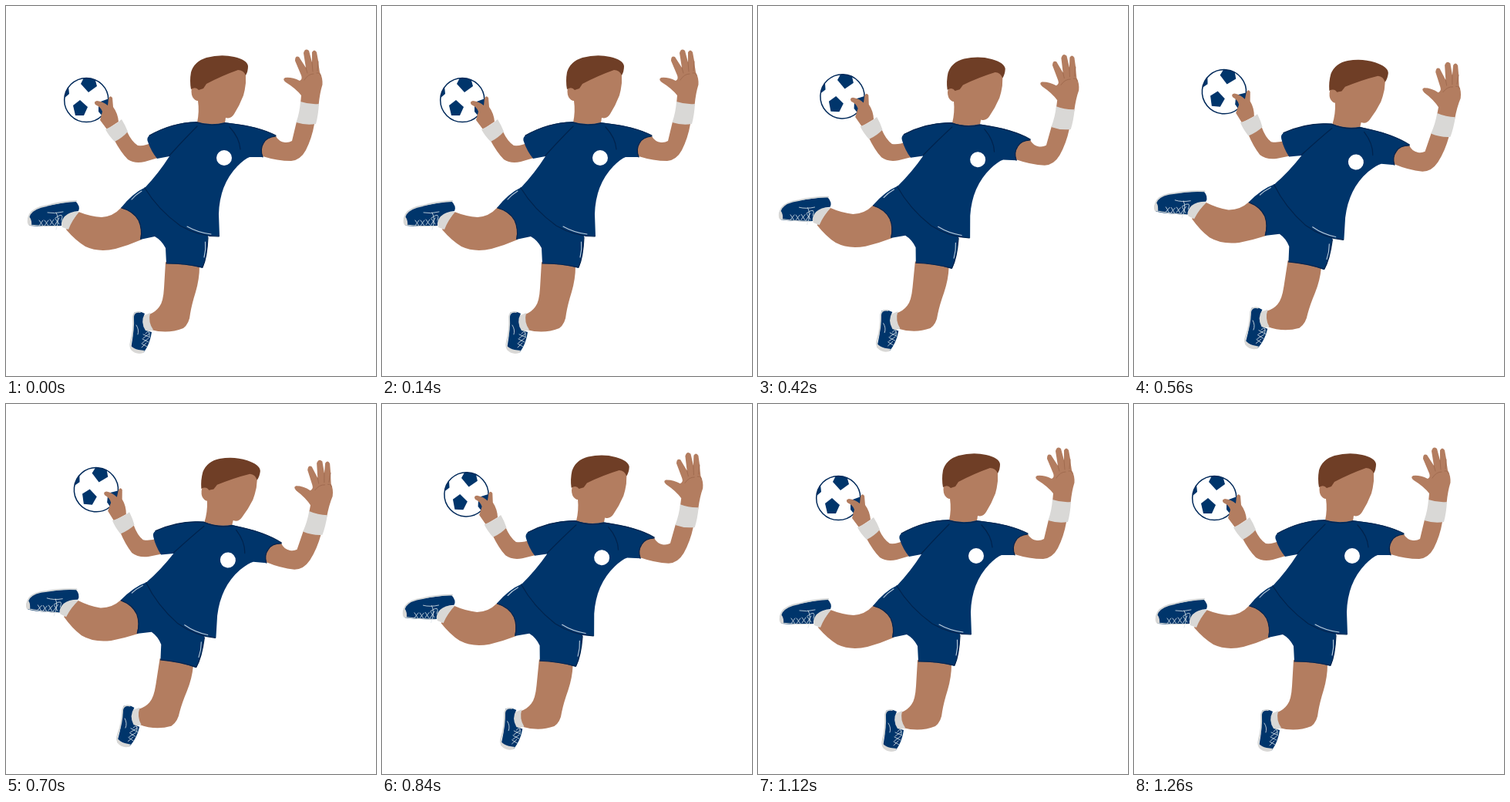
These frames come from a looping animation (480 px wide and 480 px high, 1400 ms). An HTML page:

```html
<!DOCTYPE html>
<html lang="en">
<head>
<meta charset="utf-8">
<title>Handball player</title>
<style>
  html, body { margin: 0; width: 100%; height: 100%; overflow: hidden; background: #fff; }
  svg { display: block; width: 100%; height: 100%; }
  .skin { fill: #b37d60; }
  .navy { fill: #00356b; }
  .band { fill: #d9d8d6; }
  .hair { fill: #6f3e26; }
  .seam, .crease, .shine, .lace, .sole { fill: none; stroke-linecap: round; stroke-linejoin: round; }
  .seam { stroke: #00234d; stroke-width: 1.2; }
  .crease { stroke: #9c674c; stroke-width: .8; }
  .shine { stroke: #b9cbdc; stroke-width: 1.1; }
  .lace { stroke: #dfe5ea; stroke-width: .8; }
  .sole { stroke: #d3d5d5; stroke-width: 1.8; }
</style>
</head>
<body>
<svg viewBox="0 0 480 480">
  <defs><clipPath id="round"><circle cx="104.3" cy="122" r="28.5"/></clipPath></defs>
  <g id="player">
    <!-- ball -->
    <circle cx="104.3" cy="122" r="28.6" fill="#fff"/>
    <g class="navy" clip-path="url(#round)">
      <path d="M97 101L101 93H115L118 104L107 112Z"/>
      <path d="M87 129L96 122L106 131L101 142L90 142Z"/>
      <path d="M120 125L134 120V134L126 144L120 137Z"/>
      <path d="M74 108L81 104L82 114L75 120Z"/>
    </g>
    <circle cx="104.3" cy="122" r="28.6" fill="none" stroke="#00295a" stroke-width="1.5"/>

    <!-- throwing arm -->
    <path class="skin" d="M131 160L122 148L125 137Q123 131 116 128Q113 124 118 123Q126 124 132 129L133 120Q135 115 138 119L139 131Q145 139 146 150Z"/>
    <path class="skin" d="M140 173Q149 190 158 199Q167 205 180 202L197 197L190 177Q180 182 171 181Q163 176 157 163Z"/>
    <path class="band" d="M129 160Q141 155 150 147Q155 155 158 163Q151 171 141 176Q133 168 129 160Z"/>

    <!-- legs -->
    <path class="skin" d="M149 262Q139 273 124 274Q109 273 94 267L78 290Q90 304 103 312Q120 320 142 315Q160 310 176 303L185 280L170 255Z"/>
    <path class="skin" d="M207 332L205 366Q204 384 199 390Q194 397 186 400Q183 412 188 420Q210 426 230 418Q238 412 239 399Q241 387 246 371Q251 354 251 338Z"/>
    <path class="band" d="M76 271Q84 266 95 267Q86 277 81 290L73 287Q70 279 76 271Z"/>
    <path class="band" d="M178 402L187 398Q184 410 191 420L182 423Q175 413 178 402Z"/>

    <!-- shoes -->
    <path class="navy" d="M30 272Q35 263 49 260Q73 255 90 253Q97 260 94 266Q82 267 76 273Q71 279 72 285Q50 287 31 285Q26 280 30 272Z"/>
    <path class="sole" d="M91 253Q70 254 53 259Q36 262 31 270Q27 278 30 283"/>
    <path class="band" d="M30 273Q34 278 33 285L29 284Q26 279 30 273Z"/>
    <path class="sole" d="M30 284Q50 286.500 70 285.500" style="stroke-width:1"/>
    <path class="lace" d="M43 278L48 285M48 278L43 285M50 278L55 285M55 278L50 285M57 277L62 284M62 277L57 284M64 276L69 283M69 275L63 285M54 268Q63 270 74 267M65 268Q70 276 65 290M64 275Q76 266 72 278"/>
    <path class="navy" d="M166 398Q173 395 180 399Q174 410 181 421L189 423Q187 438 179 449Q171 452 162 445Q165 431 165 416Z"/>
    <path class="sole" d="M174 397Q166 396 165 403Q166 421 162 435Q160 443 164 446"/>
    <path class="band" d="M161 440Q166 445 172 446L180 447L178 450Q169 453 162 446Z"/>
    <path class="lace" d="M169 414Q173 420 171 426M178 426L187 430M186 425L178 431M177 432L185 436M185 431L177 437M176 438L183 442M182 437L176 443M181 425Q187 418 186 429"/>

    <!-- shorts -->
    <path class="navy" d="M181 235Q164 243 149 262Q165 266 172 278Q177 289 174 303L193 299Q202 304 207 314L208 334Q233 334 255 340Q261 326 262 298Z"/>
    <path class="seam" d="M150 262Q165 266 172 278Q177 289 175 302M208 334Q233 334 255 339Q261 326 262 300"/>
    <path class="shine" d="M163 251Q168 245 176 240M258.500 306Q259.500 316 257 326"/>

    <!-- head -->
    <path class="skin" d="M242 104Q239 111 242 118Q245 123 249 123Q251 137 248 151Q265 159 284 152L285 145Q292 147 296 140Q303 129 308 116Q310 109 311 100V82L280 78Z"/>
    <path class="hair" d="M240 108Q238 97 240 86Q244 72 260 67Q279 62 296 66Q313 70 314 78Q314 85 311 90Q308 83 301 83Q281 90 260 101L256 107L250 109Q246 104 240 108Z"/>

    <!-- shirt -->
    <path class="navy" d="M247 150Q216 151 186 168Q182 171 184 176Q188 188 196 198L212 195Q198 217 180 236Q197 264 226 285Q250 299 277 299L276 270Q277 232 300 208Q310 198 316 196L333 196L350 168Q327 156 298 153L284 151Q265 156 247 150Z"/>
    <path class="seam" d="M247 151Q216 151 186 168M248 156Q231 173 212 194M286 152Q327 156 350 168M290 157Q303 171 304 186M247 151Q265 157 285 152"/>
    <path class="seam" d="M180 236Q197 264 226 285Q250 299 276 299"/>
    <path class="shine" d="M235 286Q249 294 266 296"/>
    <circle cx="283" cy="197" r="10" fill="#fff"/>

    <!-- raised arm -->
    <path class="skin" d="M350 169Q338 170 334 178Q329 186 333 195Q352 201 370 201Q382 200 389 187Q397 171 400 153L377 150L371 175Q367 177.500 362 177Q354 176 350 169Z"/>
    <path class="seam" d="M350 169Q338 170 334 178Q329 186 333 196"/>
    <path class="skin" d="M382 127L383 116Q376 107 363 99Q358 95 362 93Q371 92 381 97Q385 95 383 90L375 71Q375 64 380 66L389 80L386 61Q388 54 393 58L397 73L397 60Q400 55 403 60L405 71Q406 80 407 86Q411 93 410.500 102Q407 113 405.500 129Z"/>
    <path class="crease" d="M389 80L391 87M397 73L398 85M405 72L404 84M387 96Q392 88 399 88M403 87Q407 86 408 90"/>
    <path class="band" d="M382 124Q394 128 406 127Q405 142 402 153Q389 155 376.500 151Q381 138 382 124Z"/>
  </g>
</svg>
<script>
  const player = document.getElementById('player');
  const LOOP = 1400, STEP = 280;
  const angles = [0, 2.25, 5.35, 2.25, 0];

  // The whole body leans about the hips in hard steps.
  function draw(ms) {
    const lean = angles[Math.floor((ms % LOOP) / STEP)];
    player.setAttribute('transform', `rotate(${lean} 226 252)`);
  }

  const start = performance.now();
  function tick() {
    draw(performance.now() - start);
    requestAnimationFrame(tick);
  }
  draw(0);
  requestAnimationFrame(tick);
</script>
</body>
</html>
```
